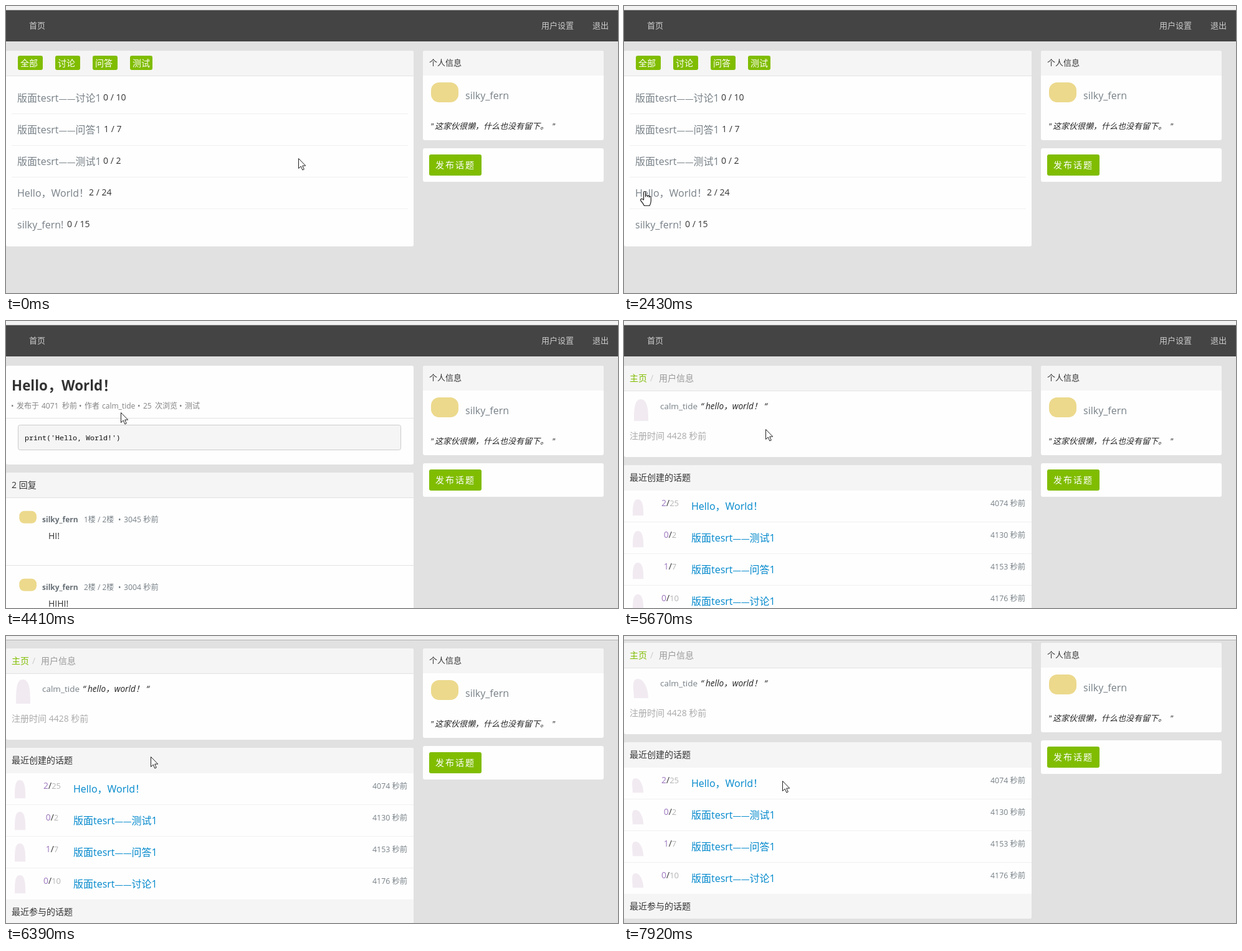
Recreate the animation shown at these times as an HTML page. Size 982 px wide and 462 px high, loop 8 s.

```html
<!DOCTYPE html>
<html lang="zh-CN">
<head>
<meta charset="utf-8">
<title>Forum</title>
<style>
html, body { margin: 0; width: 100%; height: 100%; overflow: hidden; background: #e1e1e1; }
svg { display: block; width: 982px; height: 462px; }
text { font-family: 'Open Sans', 'Noto Sans CJK SC', 'Noto Sans CJK', sans-serif; white-space: pre; }
</style>
</head>
<body>
<svg id="stage" viewBox="0 0 982 462"></svg>
<script>
const LOOP = 8000, STEP = 90;
const OPEN_TOPIC = 2700, SHOW_AGE = 3150, OPEN_PROFILE = 5310;
const ME = 'silky_fern', AUTHOR = 'calm_tide';
const GREEN = '#80bd01', SLATE = '#778087', INK = '#333', LINE = '#e2e2e2';
const BOLD = 'font-weight="700"', ITALIC = 'font-style="italic"';

const text = (x, y, str, size, fill = INK, extra = '') =>
  `<text x="${x}" y="${y}" font-size="${size}" fill="${fill}" ${extra}>${str}</text>`;
const rect = (x, y, w, h, fill, r = 0, extra = '') =>
  `<rect x="${x}" y="${y}" width="${w}" height="${h}" fill="${fill}" rx="${r}" ${extra}/>`;
const rule = (x, y, w, fill = LINE) => rect(x, y, w, 1, fill);
const run = (parts, y, size, fill, extra) =>
  parts.map(([x, str]) => text(x, y, str, size, fill, extra)).join('');
const board = name => `版面tesrt<tspan font-size="13.5">——</tspan>${name}1`;

// Card with an optional tinted header
const card = (x, y, w, h, head = 0) => rect(x, y, w, h, '#fefefe', 3) +
  (head ? `<path d="M${x} ${y + head}v${3 - head}q0-3 3-3h${w - 6}q3 0 3 3v${head - 3}z" fill="#f5f5f5"/>` : '');

const dog = (x, y, k = 1) => rect(x + 2 * k, y + k, 44 * k, 32 * k, '#ecd98c', 13 * k);
const pet = (x, y, k = 1) => `<g transform="translate(${x} ${y}) scale(${k})"><path class="pet" fill="#f1ebf1"/></g>`;

function navbar() {
  return rect(0, 7, 982, 50, '#444') + run([[37, '首页'], [859, '用户设置'], [941, '退出']], 36, 13, '#ccc');
}

function sidebar() {
  return card(669, 72, 290, 144, 40) + text(679, 96, '个人信息', 13) + dog(680, 122) +
    text(737, 150, ME, 16, SLATE) +
    run([[681, '"'], [688, '这家伙很懒，什么也没有留下。'], [876, '"']], 198, 13, '#222', ITALIC) +
    card(669, 229, 290, 54) + rect(679, 239, 84, 34, GREEN, 3) +
    text(689, 261, '发布话题', 14, '#fff', 'letter-spacing="2"');
}

function listPage() {
  const tabs = [[19, 40, '全部'], [79, 40, '讨论'], [139, 40, '问答'], [199, 36, '测试']];
  const topics = [
    [board('讨论'), 156, '0 / 10'], [board('问答'), 157, '1 / 7'], [board('测试'), 156, '0 / 2'],
    ['Hello，World！', 133, '2 / 24'], [ME + '!', 98, '0 / 15']
  ];
  return card(0, 72, 654, 315, 40) + rule(0, 112, 654) +
    tabs.map(([x, w, s]) => rect(x, 80, w, 23, GREEN, 3) + text(x + 4, 97, s, 14, '#fff')).join('') +
    topics.map(([name, x, count], i) => {
      const y = 154 + i * 51;
      return text(18, y, name, 16, SLATE) + text(x, y - 2, count, 14) +
        (i < 4 ? rule(9, y + 19, 636, '#f0f0f0') : '');
    }).join('');
}

function reply(y, floor, age, body) {
  return dog(20, y, .63) + text(58, y + 19, ME, 12, '#666f76', BOLD) +
    run([[125, floor + '楼 / 2楼'], [180, '•']], y + 19, 12, SLATE) +
    text(189, y + 19, age + ' 秒前', 12.3, SLATE, 'class="age"') + text(68, y + 46, body, 14);
}

function topicPage() {
  const meta = [[8, '•'], [17, '发布于'], [57, '4071'], [90, '秒前'], [117, '•'], [126, '作者'], [154, AUTHOR],
    [211, '•'], [220, '25'], [239, '次浏览'], [278, '•'], [287, '测试']];
  return card(0, 72, 654, 159) + run([[9, 'Hello，'], [89, 'World！']], 112, 22.4, INK, BOLD) +
    run(meta, 141, 12, '#838383') + rule(0, 156, 654) +
    rect(19.5, 167.5, 614, 40, '#f5f5f5', 3, 'stroke="#ccc"') +
    text(30, 192, "print('Hello, World!')", 11.67, '#111', `style="font-family:'Noto Sans Mono',monospace"`) +
    card(0, 244, 654, 260, 40) + text(9, 269, '2 回复', 14) + rule(0, 284, 654) +
    reply(305, 1, 3045, 'HI!') + rule(0, 393, 654) + reply(414, 2, 3004, 'HIHI!');
}

function profilePage() {
  const topics = [[2, 25, 'Hello，World！', 4074], [0, 2, board('测试'), 4130],
    [1, 7, board('问答'), 4153], [0, 10, board('讨论'), 4176]];
  return card(0, 72, 654, 147, 40) + rule(0, 112, 654) +
    text(9, 97, '主页', 14, GREEN) + text(42, 97, '/', 14, '#ccc') + text(56, 97, '用户信息', 14, '#999') +
    pet(8, 122) + text(58, 142, AUTHOR, 13.5, SLATE) +
    run([[123, '“'], [131, 'hello，world！'], [225, '“']], 142, 13.6, '#222', ITALIC) +
    text(9, 190, '注册时间 4428 秒前', 14, '#aaa') +
    card(0, 232, 654, 284, 41) + text(9, 257, '最近创建的话题', 14) +
    topics.map(([n, views, name, age], i) => {
      const y = 273 + i * 51;
      return pet(8, y + 11, .75) +
        text(74, y + 25, `<tspan fill="#9e78c0">${n}</tspan>/<tspan font-size="13" fill="#b4b4b4">${views}</tspan>`,
          14, INK, 'text-anchor="middle"') +
        text(108, y + 31, name, 16, '#08c') +
        text(644, y + 25, age + ' 秒前', 12.3, SLATE, 'text-anchor="end"') +
        (i < 3 ? rule(0, y + 50, 654, '#f0f0f0') : '');
    }).join('') +
    rect(0, 476, 654, 40, '#f5f5f5', 3) + rect(0, 476, 654, 5, '#f5f5f5') + text(9, 501, '最近参与的话题', 14);
}

const stage = document.getElementById('stage');
stage.innerHTML = rect(0, 0, 982, 462, '#e1e1e1') +
  `<g id="scroll">${navbar()}${sidebar()}<g id="list">${listPage()}</g><g id="topic">${topicPage()}</g>` +
  `<g id="profile">${profilePage()}</g></g>` +
  rect(0, 0, 982, 6, '#f2f2f2') + rule(0, 6, 982, '#b4b4b4') +
  `<g id="cursor" fill="#fff" stroke="#222" stroke-linejoin="round">
    <path id="arrow" d="M.5.5V16.5L4.2 13L6.8 19L9.3 17.9L6.7 12.1H11.7Z"/>
    <path id="hand" stroke-width="1.2" d="M-1.5 14V2Q-1.5.5 0 .5T1.5 2V9V8Q1.6 6.4 3 6.5T4.5 8V9Q4.7 7 6 7.2T7.4 8.8V10Q7.8 8 9 8.3T10.3 10V16Q10 20 8 23.5H-.5Q-2 20-6 15.5Q-7 13.5-5.5 12.6Q-4 12-1.5 14Z"/>
  </g>`;

// time, x, y of the pointer tip
const PATH = [[0, 469, 245], [270, 469, 245], [810, 327, 288], [1080, 7, 298], [1440, 20, 300], [1980, 31, 299],
  [2700, 34, 298], [3060, 127, 259], [3420, 150, 225], [4140, 184, 147], [4410, 184, 147], [4590, 184, 136],
  [5310, 184, 136], [5670, 227, 174], [6030, 232, 194], [6840, 232, 194], [7650, 254, 233], [LOOP, 254, 233]];
// height and lean of the bouncing avatar
const POSES = [[38, 3], [36, 5], [34, 3], [36, 0], [32, -5], [40, 0]];

function pointer(t) {
  const i = PATH.findIndex(p => p[0] > t);
  const [a, b] = [PATH[i - 1], PATH[i]];
  const k = (t - a[0]) / (b[0] - a[0]);
  return [1, 2].map(n => Math.round(a[n] + (b[n] - a[n]) * k));
}

const $ = id => document.getElementById(id);
const show = (el, on) => el.setAttribute('visibility', on ? 'inherit' : 'hidden');
const ages = [...document.querySelectorAll('.age')];
const pets = [...document.querySelectorAll('.pet')];

function draw(ms) {
  const step = Math.floor(ms / STEP), t = step * STEP;
  show($('list'), t < OPEN_TOPIC);
  show($('topic'), t >= OPEN_TOPIC && t < OPEN_PROFILE);
  show($('profile'), t >= OPEN_PROFILE);
  ages.forEach(el => show(el, t >= SHOW_AGE && t < OPEN_PROFILE));

  const k = Math.min(1, Math.max(0, (t - 6210) / 380));
  const y = Math.round(61 * (1 - (1 - k) ** 3));
  $('scroll').setAttribute('transform', `translate(0 ${-y})`);

  const [h, lean] = POSES[step % POSES.length];
  const top = 40 - h, mid = 19 + lean;
  const shape = `M8 39C8 ${top + 18} ${mid - 11} ${top} ${mid} ${top}S31 ${top + 18} 31 39Z`;
  pets.forEach(el => el.setAttribute('d', shape));

  const over = (t >= 1080 && t < OPEN_TOPIC) || (t >= 4590 && t < OPEN_PROFILE);
  show($('arrow'), !over);
  show($('hand'), over);
  $('cursor').setAttribute('transform', `translate(${pointer(t)})`);
}

const start = performance.now();
function tick() {
  draw((performance.now() - start) % LOOP);
  requestAnimationFrame(tick);
}
draw(0);
requestAnimationFrame(tick);
</script>
</body>
</html>
```
